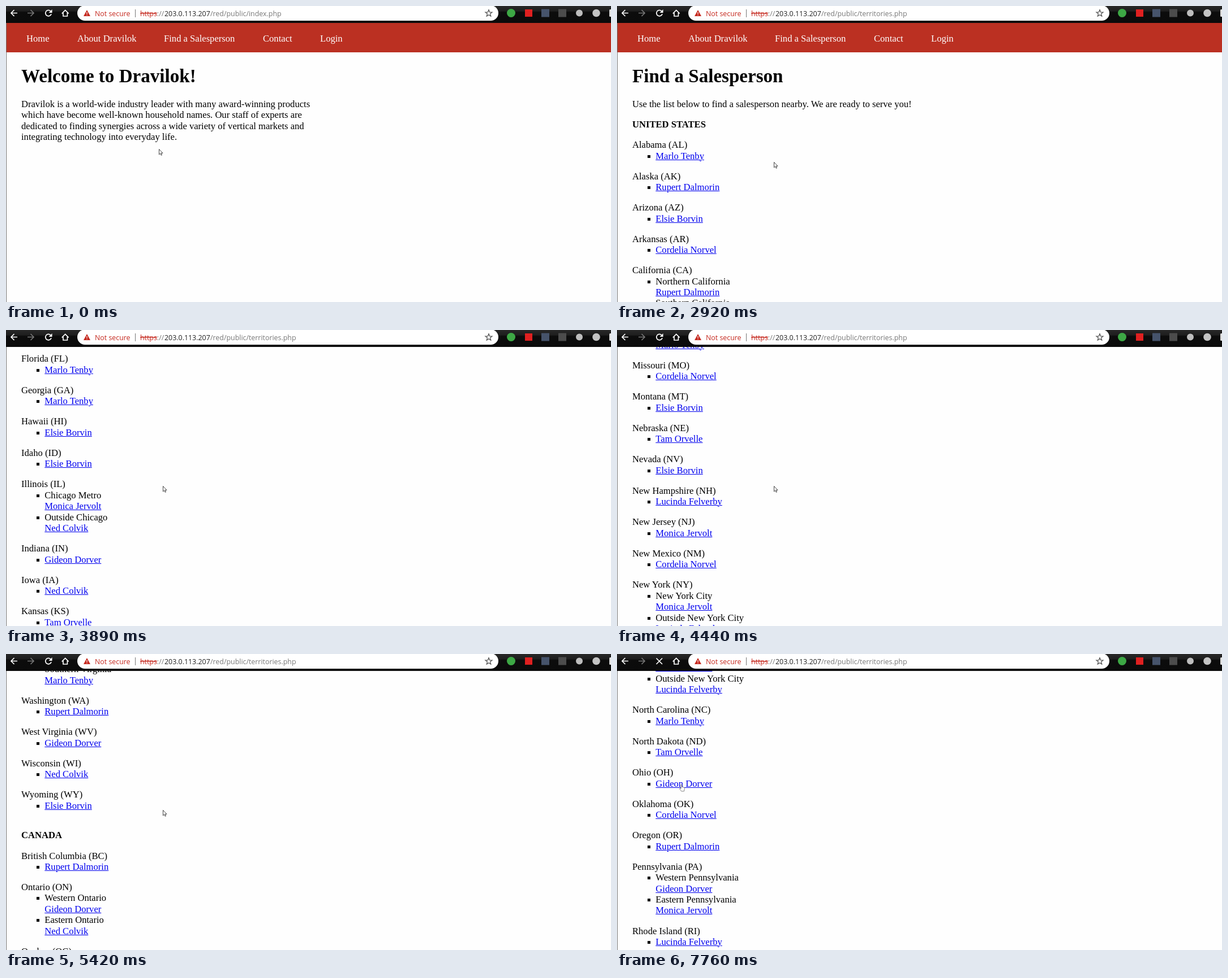
An HTML page for the animation above (8 s loop, 1069 px wide and 524 px high).

```html
<!DOCTYPE html>
<html lang="en">
<head>
<meta charset="utf-8">
<title>Find a Salesperson</title>
<style>
html, body { margin: 0; width: 100%; height: 100%; overflow: hidden; background: #fefefe; }
#stage { position: relative; width: 1069px; height: 524px; overflow: hidden; background: #fefefe; }
#page { position: absolute; inset: 0; font: 16.6px/19.45px "Liberation Serif", serif; color: #000; white-space: nowrap; }
nav { position: absolute; top: 30px; width: 1069px; height: 51.5px; background: #bb3022; color: #fff; }
nav span { position: absolute; top: 17.7px; }
main { position: absolute; left: 27px; top: 105px; }
h1 { margin: 0 0 21px; font-size: 33.1px; line-height: 38px; }
p, h2, ul { margin: 0 0 16.6px; font-size: inherit; }
ul { padding: 0 0 0 41.3px; list-style: none; }
li { position: relative; }
li::before { content: ""; position: absolute; left: -14px; top: 8px; width: 5px; height: 5px; background: #000; }
u { color: #00e; text-decoration-thickness: 1px; }
svg { position: absolute; left: 0; top: 0; }
text { font: 12.4px "Open Sans", "Noto Sans", sans-serif; }
</style>
</head>
<body>
<div id="stage">
  <div id="page">
    <nav></nav>
    <main id="home">
      <h1>Welcome to Dravilok!</h1>
      <p>Dravilok is a world-wide industry leader with many award-winning products<br>
      which have become well-known household names. Our staff of experts are<br>
      dedicated to finding synergies across a wide variety of vertical markets and<br>
      integrating technology into everyday life.</p>
    </main>
    <main id="finder">
      <h1>Find a Salesperson</h1>
      <p>Use the list below to find a salesperson nearby. We are ready to serve you!</p>
    </main>
  </div>
  <svg width="1069" height="524" fill="none">
    <defs>
      <linearGradient id="chrome" x2="0" y2="1">
        <stop stop-color="#282828"/><stop offset=".3" stop-color="#1e1e1e"/>
        <stop offset=".36" stop-color="#0c0c0c"/><stop offset="1" stop-color="#0b0b0b"/>
      </linearGradient>
    </defs>
    <path d="M.5 30V524" stroke="#777"/>
    <path d="M0 0H1069V30H0Z" fill="url(#chrome)"/>
    <rect x="126" y="-1" width="744" height="27" rx="13.5" fill="#fff"/>
    <g stroke="#fff" stroke-width="1.7">
      <path d="M20 12.5H9M14.5 7L9 12.5 14.5 18"/>
      <path d="M38 12.5H49M43.5 7L49 12.5 43.5 18" stroke="#777"/>
      <g id="reload"><path d="M78.6 8.8A5.2 5.2 0 1 0 80 14"/><path d="M81.5 6V12H75.5Z" fill="#fff" stroke="none"/></g>
      <path id="stop" d="M69.5 7.5L80 18M80 7.5L69.5 18"/>
      <path d="M98.7 13.3L104.7 7.5 110.7 13.3M101 12V18H108.4V12"/>
    </g>
    <path d="M143 7L149 18H137Z" fill="#c5291f"/>
    <path d="M143 11V14M143 15.2V16.6" stroke="#fff" stroke-width="1.3"/>
    <path d="M228.5 6V20" stroke="#777"/>
    <text x="157" y="17.5" fill="#c5291f">Not secure</text>
    <text x="237" y="17.5" fill="#777"><tspan fill="#c5291f" text-decoration="line-through">https</tspan>://<tspan x="280" fill="#222">203.0.113.207</tspan><tspan id="path" x="361"></tspan></text>
    <path id="star" stroke="#555" stroke-width="1.3"/>
    <circle cx="892.5" cy="12.5" r="7.5" fill="#3da845"/>
    <path d="M917 6H930V19H917Z" fill="#e02020"/>
    <path d="M946 5.5H960V19.5H946Z" fill="#46536b"/>
    <path d="M976 5.5H990V19.5H976Z" fill="#4c4c4c"/>
    <circle cx="1013" cy="12.5" r="6" fill="#bdbdbd"/>
    <circle cx="1043" cy="12.5" r="6.8" fill="#c4c4c4"/>
    <path d="M1069 6H1067.5Q1066 6 1066 7.5V17.5Q1066 19 1067.5 19H1069Z" fill="#ddd"/>
    <g id="cursor" fill="#fff" stroke="#333" stroke-width=".9">
      <path id="arrow" d="M.5.5V10L2.6 8 4.2 11.3 5.6 10.7 4.1 7.4H7Z"/>
      <path id="hand" d="M3 8V1.5Q3.9.2 4.8 1.5V5.5L8.6 6.3Q9.5 6.6 9.4 8L8.4 13H3.8L.8 8.8Q.6 7.2 3 8Z" stroke-dasharray="1.5 .8"/>
    </g>
  </svg>
</div>
<script>
const $ = id => document.getElementById(id);
const LOOP = 8000;

const people = ["Marlo Tenby", "Rupert Dalmorin", "Elsie Borvin", "Cordelia Norvel", "Monica Jervolt",
  "Ned Colvik", "Gideon Dorver", "Tam Orvelle", "Lucinda Felverby"];

// Each entry: region, code, then a person index or a list of "district:person".
const countries = {
  "UNITED STATES": `Alabama AL 0|Alaska AK 1|Arizona AZ 2|Arkansas AR 3
|California CA Northern California:1,Southern California:2|Colorado CO 2|Connecticut CT 8|Delaware DE 4
|Florida FL 0|Georgia GA 0|Hawaii HI 2|Idaho ID 2|Illinois IL Chicago Metro:4,Outside Chicago:5
|Indiana IN 6|Iowa IA 5|Kansas KS 7|Kentucky KY 6|Louisiana LA 3|Maine ME 8|Maryland MD 4
|Massachusetts MA 8|Michigan MI 5|Minnesota MN 7|Mississippi MS 0|Missouri MO 3|Montana MT 2
|Nebraska NE 7|Nevada NV 2|New Hampshire NH 8|New Jersey NJ 4|New Mexico NM 3
|New York NY New York City:4,Outside New York City:8|North Carolina NC 0|North Dakota ND 7|Ohio OH 6
|Oklahoma OK 3|Oregon OR 1|Pennsylvania PA Western Pennsylvania:6,Eastern Pennsylvania:4
|Rhode Island RI 8|South Carolina SC 0|South Dakota SD 7|Tennessee TN 0|Texas TX 3|Utah UT 2|Vermont VT 8
|Virginia VA Northern Virginia:6,Southern Virginia:0|Washington WA 1|West Virginia WV 6|Wisconsin WI 5|Wyoming WY 2`,
  "CANADA": `British Columbia BC 1|Ontario ON Western Ontario:6,Eastern Ontario:5|Quebec QC 8`
};

function districtHtml(entry) {
  const [person, district] = entry.split(":").reverse();
  return `<li>${district ? district + "<br>" : ""}<u>${people[person]}</u></li>`;
}

function regionHtml(entry) {
  const [, name, code, districts] = entry.trim().match(/^(.+) ([A-Z]{2}) (.+)$/);
  return `${name} (${code})<ul>${districts.split(",").map(districtHtml).join("")}</ul>`;
}

$("finder").innerHTML += Object.entries(countries).map(([country, regions]) =>
  `<h2>${country}</h2><div style="margin-bottom:33.2px">${regions.split("|").map(regionHtml).join("")}</div>`).join("");

const menu = [[36, "Home"], [126, "About Dravilok"], [279, "Find a Salesperson"], [454, "Contact"], [555, "Login"]];
document.querySelector("nav").innerHTML =
  menu.map(([x, label]) => `<span style="left:${x}px">${label}</span>`).join("");

$("star").setAttribute("d", "M" + Array.from({ length: 10 }, (_, i) => {
  const r = i % 2 ? 2.7 : 6.3, a = i * Math.PI / 5;
  return `${853 + r * Math.sin(a)} ${13 - r * Math.cos(a)}`;
}).join("L") + "Z");

const linear = p => p;
const easeIn = p => p * p;
const easeOut = p => 1 - (1 - p) ** 2;
const smooth = p => p * p * (3 - 2 * p);
const settle = p => 1 - (1 - p) ** 1.837;

// Moves: first step time, last step time, step count, end value, easing.
const scrollMoves = [
  [3350, 3890, 5, [697], easeIn],
  [4040, 4840, 7, [2333], linear],
  [4980, 5420, 4, [3008], easeOut],
  [5880, 6734, 7, [2098], settle]
];
const cursorMoves = [
  [280, 700, 4, [326, 67], smooth],
  [1130, 1130, 1, [325, 67], linear],
  [1530, 2490, 8, [282, 234], smooth],
  [2610, 2920, 3, [277, 276], easeOut],
  [6880, 6880, 1, [151, 266], linear],
  [7030, 7480, 4, [110, 230], easeOut]
];

function valueAt(t, start, moves) {
  let value = start;
  for (const [begin, end, count, target, ease] of moves) {
    if (t < begin) break;
    const steps = count > 1 ? 1 + Math.floor((t - begin) / (end - begin) * (count - 1) + 1e-6) : 1;
    const p = ease(Math.min(1, steps / count));
    value = value.map((v, i) => v + (target[i] - v) * p);
  }
  return value;
}

const between = (t, from, to) => t >= from && t < to;
const show = (id, on) => $(id).style.display = on ? "" : "none";

function draw() {
  const t = performance.now() % LOOP;
  const [scroll] = valueAt(t, [0], scrollMoves);
  const [x, y] = valueAt(t, [270, 253], cursorMoves).map(Math.round);
  const loading = between(t, 1250, 2770) || t >= 7760;
  const pointing = between(t, 1130, 1530) || t >= 7480;

  $("page").style.transform = `translateY(${-Math.round(scroll)}px)`;
  $("cursor").setAttribute("transform", `translate(${x} ${y})`);
  $("path").textContent = `/red/public/${t < 2370 ? "index" : "territories"}.php`;
  show("home", t < 2610);
  show("finder", t >= 2610);
  show("reload", !loading);
  show("stop", loading);
  show("arrow", !pointing);
  show("hand", pointing);
  requestAnimationFrame(draw);
}
draw();
</script>
</body>
</html>
```
